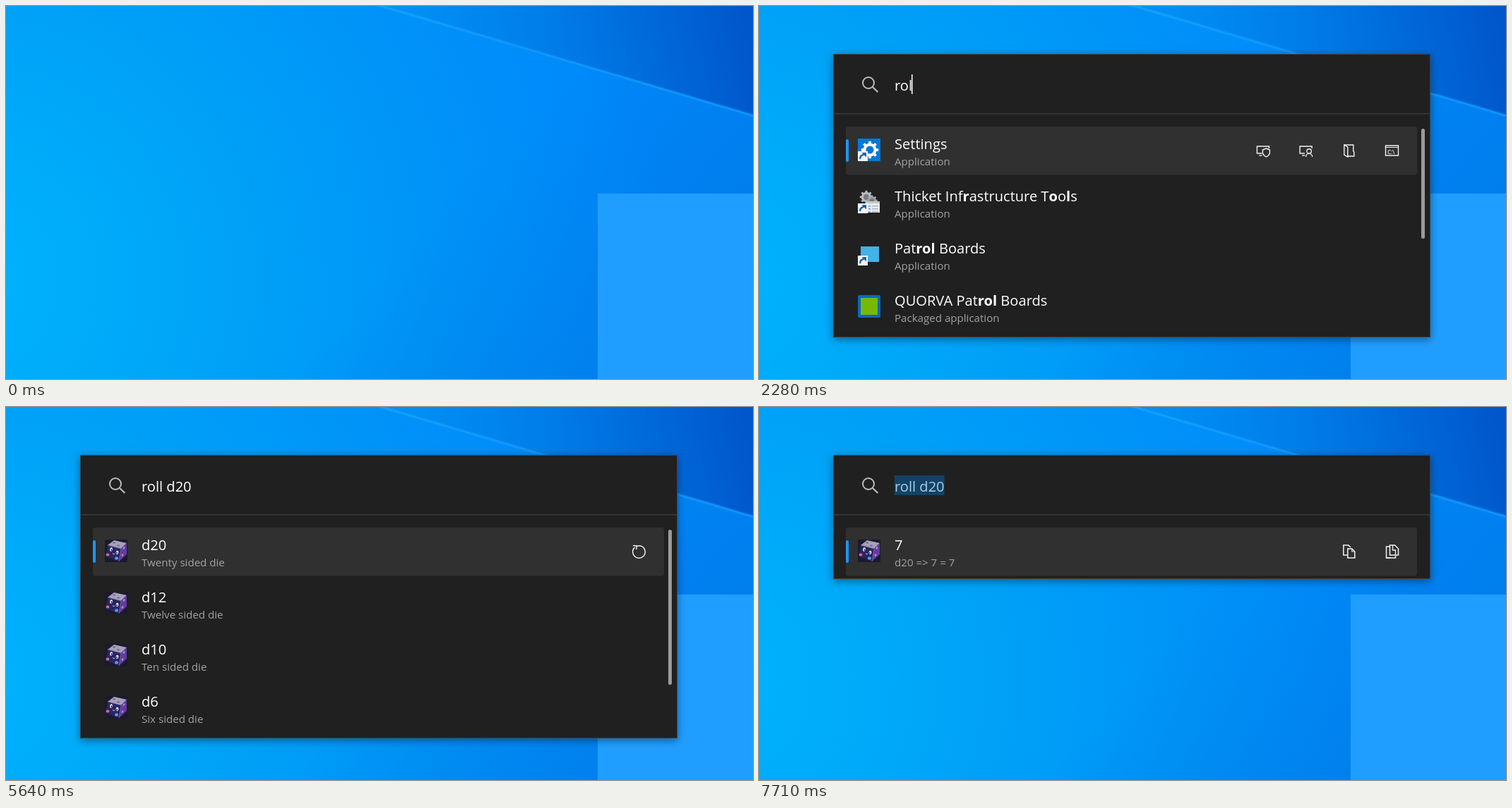
An HTML page with a canvas for the animation above (8000 ms loop, 1058 by 529 pixels).

```html
<!DOCTYPE html>
<html lang="en">
<head>
<meta charset="utf-8">
<title>Launcher dice roll</title>
<style>
  html, body { margin: 0; width: 100%; height: 100%; overflow: hidden; background: #0098f6; }
  canvas { display: block; width: 1058px; height: 529px; }
</style>
</head>
<body>
<canvas id="stage" width="1058" height="529"></canvas>
<script>
const W = 1058, H = 529, LOOP = 8000;
const ctx = document.getElementById('stage').getContext('2d');
const FONT = '"Open Sans", "Noto Sans", sans-serif';
const BIG = 20.1, SMALL = 15.1;
const WIN = { x: 105, y: 68, w: 846 };
const ROW_STEP = 74;

const LISTS = {
  apps: {
    thumb: 156, match: true, actions: [admin, user, folder, terminal],
    rows: [
      ['Settings', 'Application', settingsIcon],
      ['Thicket Infrastructure Tools', 'Application', toolsIcon],
      ['Patrol Boards', 'Application', panelIcon],
      ['QUORVA Patrol Boards', 'Packaged application', tileIcon]
    ]
  },
  dice: {
    thumb: 220, actions: [refresh],
    rows: [
      ['d20', 'Twenty sided die', dieIcon],
      ['d12', 'Twelve sided die', dieIcon],
      ['d10', 'Ten sided die', dieIcon],
      ['d6', 'Six sided die', dieIcon]
    ]
  },
  result: { actions: [copy, copyAll], rows: [['7', 'd20 => 7 = 7', dieIcon]] },
  blank: { actions: [], rows: [] }
};

// time, query, view, selected row
const CUES = [
  [0, '', 'hidden', 0],
  [800, '', 'blank', 0],
  [1630, '', 'bar', 0],
  [1670, 'r', 'bar', 0],
  [1730, 'r', 'apps', 0],
  [1900, 'ro', 'apps', 0],
  [2210, 'rol', 'apps', 0],
  [2310, 'roll', 'apps', 0],
  [2340, 'roll', 'bar', 0],
  [2490, 'roll', 'dice', 0],
  [4070, 'roll d12', 'dice', 1],
  [4930, 'roll d20', 'dice', 0],
  [5840, 'roll d20', 'bar', 0],
  [6020, 'roll d20', 'flash', 0],
  [6050, 'roll d20', 'result', 0],
  [7070, '', 'hidden', 0],
  [7710, 'roll d20', 'result', 0]
];
// caret turns on at even places, off at odd ones
const CARET = [800, 1380, 1670, 2880, 3370, 3860, 4070, 4650, 5160, 5640, 6230, 6740];
const HEIGHTS = { bar: 85, flash: 177, result: 176, apps: 402, dice: 402, blank: 402 };

function poly(points, fill) {
  ctx.beginPath();
  points.forEach(([x, y], i) => i ? ctx.lineTo(x, y) : ctx.moveTo(x, y));
  ctx.closePath();
  ctx.fillStyle = fill;
  ctx.fill();
}

function line(points, color = '#f2f2f2', width = 1.4, close = false) {
  ctx.beginPath();
  points.forEach(([x, y], i) => i ? ctx.lineTo(x, y) : ctx.moveTo(x, y));
  if (close) ctx.closePath();
  ctx.strokeStyle = color;
  ctx.lineWidth = width;
  ctx.stroke();
}

function rect(x, y, w, h, fill, r = 0) {
  ctx.beginPath();
  ctx.roundRect(x, y, w, h, r);
  ctx.fillStyle = fill;
  ctx.fill();
}

function dot(x, y, rx, ry, fill, turn = 0) {
  ctx.beginPath();
  ctx.ellipse(x, y, rx, ry, turn, 0, Math.PI * 2);
  ctx.fillStyle = fill;
  ctx.fill();
}

function ring(x, y, r, from = 0, to = Math.PI * 2, color = '#f2f2f2', width = 1.4) {
  ctx.beginPath();
  ctx.arc(x, y, r, from, to);
  ctx.strokeStyle = color;
  ctx.lineWidth = width;
  ctx.stroke();
}

function text(str, x, y, size, fill, weight = 400) {
  ctx.font = `${weight} ${size}px ${FONT}`;
  ctx.fillStyle = fill;
  ctx.fillText(str, x, y);
  return ctx.measureText(str).width;
}

function gradient(g, stops) {
  stops.forEach(([at, color]) => g.addColorStop(at, color));
  return g;
}

function at(x, y, draw) {
  ctx.save();
  ctx.translate(x, y);
  draw();
  ctx.restore();
}

// ---- desktop ----

function desktop() {
  rect(0, 0, W, H, gradient(ctx.createRadialGradient(-60, 390, 0, -60, 390, 1000), [
    [0, '#00b3fd'], [0.2, '#00abfa'], [0.42, '#00a0f7'], [0.7, '#0092f8'], [0.9, '#008bfb'], [1, '#0087fa']
  ]));
  const low = gradient(ctx.createLinearGradient(600, 300, 860, 529), [[0, 'rgba(0,110,215,0)'], [1, 'rgba(0,110,215,.4)']]);
  rect(0, 0, W, H, low);
  poly([[530, 0], [W, 0], [W, 155]], gradient(ctx.createLinearGradient(590, 60, 1045, -30), [
    [0, '#008ff4'], [0.4, '#007ce9'], [1, '#0056ca']
  ]));
  const glow = gradient(ctx.createLinearGradient(520, 0, 700, 50), [[0, '#1aa6fb'], [1, '#169dff']]);
  ctx.globalAlpha = 0.3;
  line([[525, -2], [1060, 156]], glow, 5);
  ctx.globalAlpha = 0.85;
  line([[525, -2], [1060, 156]], glow, 1.8);
  ctx.globalAlpha = 1;
  rect(838, 266, 300, 300, '#209eff');
}

// ---- row icons, 32 by 32 ----

function shortcut() {
  rect(0, 18, 14, 14, '#f4f6f8');
  line([[3, 29], [4, 25], [9, 22]], '#1d5fae', 2.4);
  poly([[5.5, 20], [12, 20], [12, 26.5]], '#1d5fae');
}

function gear(x, y, r, color, hole) {
  for (let i = 0; i < 8; i++) {
    at(x, y, () => {
      ctx.rotate(i * Math.PI / 4);
      rect(-r * 0.2, -r * 1.28, r * 0.4, r * 0.5, color);
    });
  }
  dot(x, y, r, r, color);
  dot(x, y, r * 0.58, r * 0.58, hole);
}

function settingsIcon() {
  rect(0, 0, 32, 32, '#0078d7');
  gear(17, 16, 9.5, '#fff', '#0078d7');
  shortcut();
}

function toolsIcon() {
  gear(12, 9, 7.2, '#b9bdc1', '#777c80');
  gear(20, 14, 6, '#a2a7ab', '#777c80');
  rect(11, 15, 20, 16, '#e9ebed');
  rect(11, 15, 20, 3, '#c3c8cd');
  for (let y = 21; y < 30; y += 4) {
    rect(15, y, 3, 1.5, '#629bd0');
    rect(20, y, 9, 1.5, '#b2b6ba');
  }
  shortcut();
}

function panelIcon() {
  rect(4, 5, 26, 22, '#43b2e6');
  shortcut();
}

function tileIcon() {
  rect(0, 0, 32, 32, '#0a68c0', 2);
  rect(4, 4, 24, 24, '#76b900');
}

function dieIcon() {
  rect(0, 0, 32, 32, '#1b1a2d');
  poly([[4, 8], [13, 1], [31, 5], [23, 13]], '#a6a1b8');
  poly([[4, 8], [23, 13], [20, 31], [1, 24]], '#2b2462');
  poly([[23, 13], [31, 5], [31, 21], [20, 31]], '#633b9e');
  line([[4, 8], [23, 13], [20, 31]], '#7773a4', 0.8);
  dot(13, 4.5, 2, 1, '#6a637f', 0.2);
  dot(19, 8.5, 2, 1, '#6a637f', 0.2);
  dot(9, 14, 1.8, 2.8, '#fff', 0.2);
  dot(17.5, 18.5, 1.8, 2.8, '#fff', 0.2);
  dot(9.4, 14.6, 0.8, 1.5, '#221b42');
  dot(17.1, 19, 0.8, 1.5, '#221b42');
  line([[11, 19.5], [12.5, 20.8], [14, 20]], '#e7d8f5', 1);
  dot(4, 21.5, 2.3, 2, '#d86a8e');
  dot(16.5, 26.5, 2.5, 2.2, '#4aa1df');
  dot(27, 12, 1.3, 1.9, '#b486de', 0.4);
  dot(25, 22, 1.3, 1.9, '#b486de', 0.4);
}

// ---- action icons, centred on 0,0 ----

function screen() {
  line([[-2, 4], [-9, 4], [-9, -6], [8, -6], [8, -3]]);
  line([[-6, 7], [-2, 7]]);
}

function admin() {
  screen();
  line([[4, -3], [9, -1], [9, 4], [7, 7], [4, 9], [1, 7], [-1, 4], [-1, -1]], undefined, 1.4, true);
}

function user() {
  screen();
  ring(4, 1, 3.2);
  ring(4, 9, 4.6, Math.PI, Math.PI * 2);
}

function folder() {
  line([[-7, -8], [6, -8], [6, 1], [7, 2], [7, 8], [-2, 8]]);
  line([[-7, -8], [-2, -5], [-2, 9], [-7, 6]], undefined, 1.4, true);
}

function terminal() {
  line([[-9, -7], [9, -7], [9, 7], [-9, 7]], undefined, 1.4, true);
  line([[-9, -4.5], [9, -4.5]], undefined, 1);
  text('C:\\', -6.5, 4.5, 8, '#f2f2f2', 600);
}

function refresh() {
  ring(0, 0.5, 8.8, -1.95, 4.05 - 0.1, '#f2f2f2', 1.5);
  line([[-8.5, -8.5], [-3.2, -8], [-3.8, -3]], undefined, 1.5);
}

function sheet(x, y) {
  line([[x, y], [x + 6, y], [x + 10, y + 4], [x + 10, y + 13], [x, y + 13]], undefined, 1.5, true);
  line([[x + 6, y], [x + 6, y + 4], [x + 10, y + 4]], undefined, 1.2);
}

function copy() {
  line([[-2, 5], [-8, 5], [-8, -9], [-1, -9], [2, -6]], undefined, 1.5);
  sheet(-2, -4);
}

function copyAll() {
  line([[-2, 9], [-8, 9], [-8, -7], [-3, -7]], undefined, 1.5);
  line([[-3, 5], [-3, -9], [4, -9], [9, -4], [9, 5]], undefined, 1.5, true);
  line([[1, -9], [1, -2], [5, -2], [5, 5]], undefined, 1.3);
  line([[-8, 9], [5, 9], [5, 6]], undefined, 1.5);
}

// ---- launcher ----

function matches(title, query) {
  const low = title.toLowerCase(), hits = new Set();
  const start = low.indexOf(query);
  let from = 0;
  for (let i = 0; i < query.length; i++) {
    const p = start >= 0 ? start + i : low.indexOf(query[i], from);
    if (p < 0) return new Set();
    hits.add(p);
    from = p + 1;
  }
  return hits;
}

function title(str, x, y, query) {
  const hits = matches(str, query);
  for (let i = 0; i < str.length;) {
    const bold = hits.has(i);
    let end = i + 1;
    while (end < str.length && hits.has(end) === bold) end++;
    x += text(str.slice(i, end), x, y, BIG, '#fff', bold ? 700 : 400);
    i = end;
  }
}

function results(list, query, selected) {
  rect(WIN.x + 1, 152, WIN.w - 2, 1.5, '#3a3a3a');
  list.rows.forEach(([name, note, icon], i) => {
    const y = 171 + i * ROW_STEP;
    if (i === selected) {
      rect(123, y, 809, 68.5, '#303030', 4);
      rect(123, y + 18, 4, 32, '#1a96fa', 2);
      const n = list.actions.length;
      list.actions.forEach((draw, k) => at(896.5 - (n - 1 - k) * 60.7, y + 34, draw));
    }
    at(140, y + 17, icon);
    title(name, 192, y + 32, list.match ? query : '');
    text(note, 192, y + 54.5, SMALL, '#a3a3a3');
  });
  if (list.thumb) rect(938, 174, 5, list.thumb, '#9b9b9b', 2.5);
}

function searchBar(query, caret, picked) {
  ring(155, 109, 8, 0, Math.PI * 2, '#bcbcbc', 2);
  line([[161, 115], [168.3, 122]], '#bcbcbc', 2.2);
  ctx.font = `400 ${BIG}px ${FONT}`;
  const width = ctx.measureText(query).width;
  if (picked) rect(192, 97, width, 28, '#124365');
  if (query) text(query, 192, 119.5, BIG, picked ? '#a9cdea' : '#fff');
  else text('Start typing...', 190.5, 119.5, 19.8, '#c9c9c9');
  if (caret) rect(Math.round(192 + width) - 1, 97, 1.5, 28, '#fff');
}

function launcher(query, view, selected, caret, picked) {
  const h = HEIGHTS[view], flash = view === 'flash';
  ctx.save();
  ctx.shadowColor = 'rgba(0,0,0,.42)';
  ctx.shadowBlur = 11;
  ctx.shadowOffsetY = 3;
  rect(WIN.x, WIN.y, WIN.w, h, flash ? '#fff' : '#202020');
  ctx.restore();
  if (flash) rect(WIN.x, WIN.y, WIN.w, HEIGHTS.bar, '#202020');
  const frame = flash ? HEIGHTS.bar : h;
  ctx.strokeStyle = '#414141';
  ctx.lineWidth = 1;
  ctx.strokeRect(WIN.x + 0.5, WIN.y + 0.5, WIN.w - 1, frame - 1);
  searchBar(query, caret, picked);
  if (LISTS[view]) results(LISTS[view], query, selected);
}

function render(t) {
  const [, query, view, selected] = CUES.findLast(cue => cue[0] <= t);
  const caret = CARET.filter(c => c <= t).length % 2 === 1;
  desktop();
  if (view !== 'hidden') launcher(query, view, selected, caret, t >= 7710);
}

const begin = performance.now();
function tick() {
  render((performance.now() - begin) % LOOP);
  requestAnimationFrame(tick);
}
tick();
</script>
</body>
</html>
```
